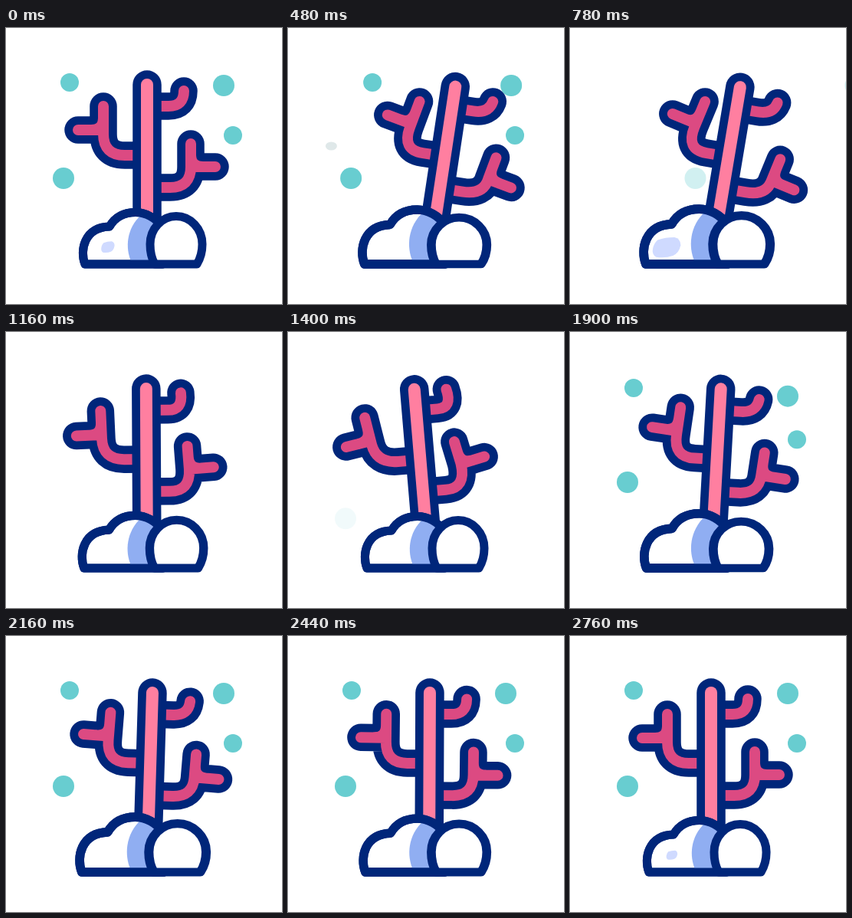
An HTML page that plays this animation: 360 px wide and 360 px high, repeating every 2.8 s.

```html
<!DOCTYPE html>
<html lang="en">
<head>
<meta charset="utf-8">
<title>Swaying coral</title>
<style>
  html, body { margin: 0; width: 100%; height: 100%; overflow: hidden; background: #fff; }
  svg { display: block; width: 100vw; height: 100vh; }
  .limb { fill: none; stroke-linecap: round; stroke-linejoin: round; }
  .rock { stroke: #00267a; stroke-width: 11; stroke-linejoin: round; }
</style>
</head>
<body>
<svg viewBox="0 0 360 360">
  <g id="bubbles" fill="#68cdd0"></g>
  <ellipse id="speck" cy="154" rx="7.5" ry="5.5" fill="#dfe8e9"/>
  <g id="coral"></g>
  <g id="leftRock">
    <path class="rock" fill="#fff" d="M103 308C96 290 102 260 135 259C143 245 156 240.500 169 240.500C182 240.500 196 248 204 260V308Z"/>
    <path fill="#90aef2" d="M177 243C156 262 156 288 163 304H204V260L184 243Z"/>
    <path id="shine" fill="#cfdaff" d="M-6 -6Q-1 -8 5 -8Q9 -7 9 -2Q8 4 4 6Q-1 8 -7 7Q-10 5 -9 0Q-8 -4 -6 -6Z"/>
    <path class="rock" fill="none" d="M103 308C96 290 102 260 135 259C143 245 156 240.500 169 240.500C182 240.500 196 248 204 260V308Z"/>
  </g>
  <path id="rightRock" class="rock" fill="#fff" d="M194 308C189 299 188 291 188 282A34 36.500 0 0 1 256 282C256 292 254 300 249 308Z"/>
</svg>
<script>
const LOOP = 2800;
const NS = 'http://www.w3.org/2000/svg';
const $ = id => document.getElementById(id);
const clamp = x => Math.min(1, Math.max(0, x));
const smooth = x => x * x * (3 - 2 * x);

function add(parent, tag, attrs = {}) {
  const node = document.createElementNS(NS, tag);
  for (const key in attrs) node.setAttribute(key, attrs[key]);
  return parent.appendChild(node);
}

// An outlined stroke: navy below, colour on top
function limb(color, outer, inner) {
  const layers = [['#00267a', outer], [color, inner]].map(([stroke, width]) =>
    add($('coral'), 'path', { class: 'limb', stroke, 'stroke-width': width }));
  return d => layers.forEach(path => path.setAttribute('d', d));
}

// Swing angles at the successive turning points of the sway
const SWING_TIMES = [0, 660, 1450, 1748, 2572, LOOP];
const TRUNK_SWING = [0, 10.5, -5, 3.5, 0, 0];

// The arm stays fixed to the trunk; everything past the elbow turns about the pivot
const branches = [
  { tip: [127, 102], stub: [94, 133], elbow: [127, 166], bend: 28,
    pivot: [143, 167], swing: [0, 14.5, -9.7, 5.7, 0, 0] },
  { tip: [241, 151], stub: [273, 181], elbow: [241, 208], bend: 27,
    pivot: [214, 200], swing: [0, 14.5, -12.3, 6.1, 0, 0] },
  { tip: [232, 82], elbow: [232, 102], bend: 20,
    pivot: [213, 102], swing: [0, 13, -17, 9, 0, 0] }
];
for (const b of branches) b.setPath = limb('#dc4a82', 35.5, 14);
limb('#ff7fa0', 37.5, 16)('M184 74V285');

// leave / enter: start times; pull: horizontal acceleration
const bubbles = [
  { x: 83, y: 71, r: 12, leave: 249, pull: 5.04e-4, enter: 1572 },
  { x: 284, y: 75, r: 14, leave: 362, pull: 5.04e-4, enter: 1680 },
  { x: 75, y: 196, r: 14, leave: 362, pull: 5.04e-4, enter: 1392 },
  { x: 296, y: 140, r: 12, leave: 475, pull: 8.4e-4, enter: 1480 }
];
for (const b of bubbles) b.node = add($('bubbles'), 'circle', { r: b.r });

function swingAt(t, values) {
  let i = 0;
  while (i < SWING_TIMES.length - 2 && t >= SWING_TIMES[i + 1]) i++;
  const p = (t - SWING_TIMES[i]) / (SWING_TIMES[i + 1] - SWING_TIMES[i]);
  return values[i] + (values[i + 1] - values[i]) * smooth(clamp(p));
}

function branchPath({ tip, stub, elbow, bend, pivot }, degrees) {
  const angle = degrees * Math.PI / 180;
  const cos = Math.cos(angle), sin = Math.sin(angle);
  const turn = (x, y) => {
    const dx = x - pivot[0], dy = y - pivot[1];
    return `${pivot[0] + dx * cos - dy * sin} ${pivot[1] + dx * sin + dy * cos} `;
  };
  const [x, y] = elbow;
  const side = Math.sign(x - 184);
  let d = `M184 ${y}H${x - side * bend}Q${x} ${y} ${turn(x, y - bend)}L${turn(...tip)}`;
  if (stub) {
    const fork = stub[1];
    d += `M${turn(...stub)}L${turn(x, fork)}`;
    d += `M${turn(x, fork - 16)}Q${turn(x, fork)}${turn(x + side * 16, fork)}`;
  }
  return d;
}

function placeBubble(b, t) {
  let { x, y } = b, alpha;
  if (t < 1300) {
    const age = Math.max(0, t - b.leave);
    x += b.pull * age * age;
    alpha = 1 - clamp((age - 300) / 170);
  } else {
    const age = t - b.enter;
    y += 50 * (1 - clamp(age / 500)) ** 3;
    alpha = clamp(age / 100);
  }
  b.node.setAttribute('cx', x);
  b.node.setAttribute('cy', y);
  b.node.setAttribute('opacity', alpha);
}

function scaleAbout(id, x, y, sx, sy) {
  $(id).setAttribute('transform',
    `translate(${x} ${y}) scale(${sx} ${sy}) translate(${-x} ${-y})`);
}

function placeRocks(t) {
  const half = t % 1400;
  const left = Math.sin(Math.PI * half / 1400) ** 2;
  const right = smooth(half < 800 ? half / 800 : (1400 - half) / 600);
  const squash = half < 800 ? Math.sin(Math.PI * half / 800) ** 2 : 0;
  scaleAbout('leftRock', 178, 308, 1 + 0.057 * left, 1 + 0.067 * left);
  scaleAbout('rightRock', 205, 308, 1 + 0.1 * right, 1 + 0.014 * right - 0.04 * squash);
}

function placeShine(t) {
  const age = (t + 100) % LOOP;
  const first = age < 400;
  const grow = clamp(0.55 + age / 250);
  const alpha = first ? clamp((400 - age) / 120)
    : clamp((t - 640) / 60) * clamp((940 - t) / 100);
  const [x, y, wide, tall] = first ? [133, 286, grow, grow] : [129, 288, 1.9, 1.6];
  $('shine').setAttribute('transform', `translate(${x} ${y}) scale(${wide} ${tall})`);
  $('shine').setAttribute('opacity', alpha);
}

function draw(t) {
  $('coral').setAttribute('transform', `rotate(${swingAt(t, TRUNK_SWING)} 184 303)`);
  for (const b of branches) b.setPath(branchPath(b, swingAt(t, b.swing)));
  for (const b of bubbles) placeBubble(b, t);
  $('speck').setAttribute('cx', 56 + (t - 480) * 0.45);
  $('speck').setAttribute('opacity', t > 400 && t < 520 ? 1 : 0);
  placeRocks(t);
  placeShine(t);
}

const start = performance.now();
function tick() {
  draw((performance.now() - start) % LOOP);
  requestAnimationFrame(tick);
}
tick();
</script>
</body>
</html>
```
